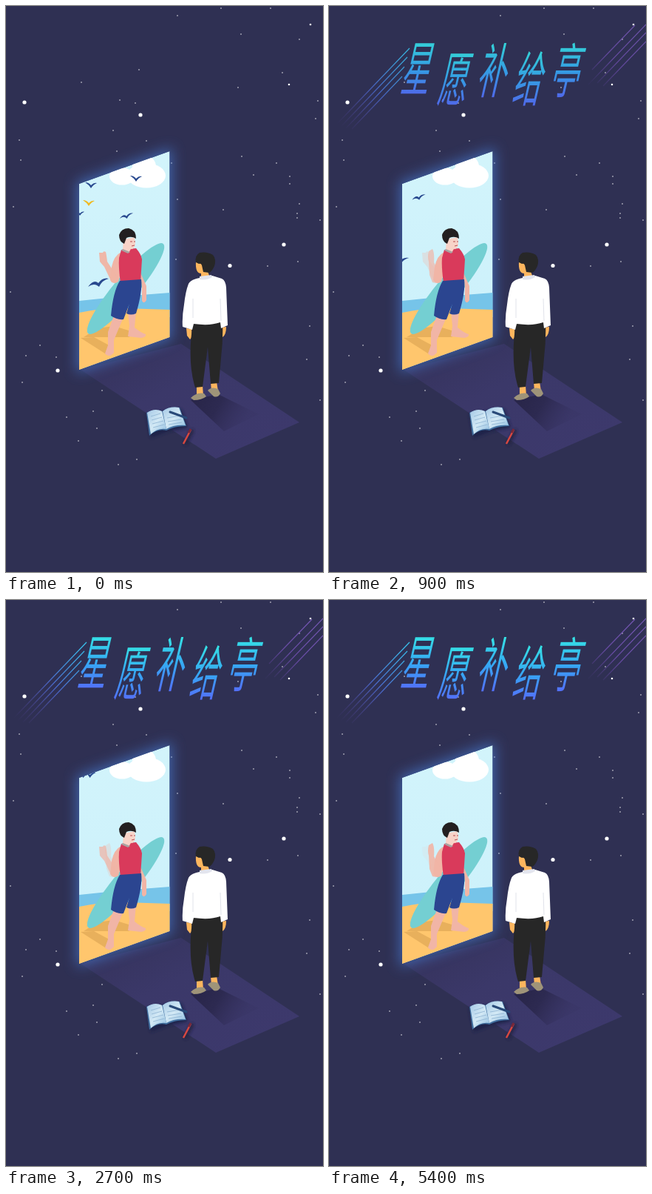
Recreate the animation shown at these times as an HTML page. Size 429 by 764 pixels, loop 5500 ms.

```html
<!DOCTYPE html>
<html lang="zh">
<head>
<meta charset="utf-8">
<style>
  html, body { margin: 0; height: 100%; overflow: hidden; background: #2f3053; }
  svg { display: block; width: 429px; height: 764px; }
  #title text { font: 300 42px "Noto Sans CJK SC", "Noto Sans CJK", sans-serif; text-anchor: middle; fill: url(#ink); }
</style>
</head>
<body>
<svg viewBox="0 0 429 764">
  <defs>
    <linearGradient id="ink" x2="0" y2="1">
      <stop offset=".2" stop-color="#35e6e4"/><stop offset=".55" stop-color="#36a7f4"/><stop offset=".9" stop-color="#5867fa"/>
    </linearGradient>
    <linearGradient id="leftRay" gradientUnits="userSpaceOnUse" x1="108" y1="60" x2="14" y2="162">
      <stop stop-color="#38c4ef"/><stop offset=".5" stop-color="#4a68c8"/><stop offset="1" stop-color="#5a3f96" stop-opacity="0"/>
    </linearGradient>
    <linearGradient id="rightRay" gradientUnits="userSpaceOnUse" x1="429" y1="25" x2="358" y2="106">
      <stop stop-color="#7659b5"/><stop offset=".6" stop-color="#674ba3"/><stop offset="1" stop-color="#5b4296" stop-opacity=".1"/>
    </linearGradient>
    <linearGradient id="sky" x2="0" y2="1"><stop stop-color="#d2f4fb"/><stop offset="1" stop-color="#cbf0fb"/></linearGradient>
    <linearGradient id="floor" x2="1" y2="1"><stop stop-color="#343259"/><stop offset=".4" stop-color="#3b3869"/><stop offset="1" stop-color="#3d396d"/></linearGradient>
    <linearGradient id="shade" gradientUnits="userSpaceOnUse" x1="262" y1="528" x2="322" y2="564">
      <stop stop-color="#29264a"/><stop offset=".4" stop-color="#2d2a51"/><stop offset="1" stop-color="#35315f" stop-opacity=".2"/>
    </linearGradient>
    <linearGradient id="page" x2="1" y2="1"><stop stop-color="#a5c9e6"/><stop offset=".5" stop-color="#d3e9f5"/><stop offset="1" stop-color="#8fbde0"/></linearGradient>
    <filter id="glow" x="-40%" y="-20%" width="180%" height="140%"><feGaussianBlur stdDeviation="9"/></filter>
    <filter id="soft" x="-30%" y="-30%" width="160%" height="160%"><feGaussianBlur stdDeviation="2"/></filter>
    <path id="frame" d="M99 240L221.500 196V447L99 491Z"/>
    <clipPath id="view"><use href="#frame"/></clipPath>
    <path id="bird" d="M-14 6Q-6-5 0 1Q6-7 14-5Q5-3 1 6L-2 4Q-7 1-14 6Z"/>
    <path id="gull" d="M-8-4Q-3-4 0 0Q4-4 8-3Q3-1 0 4Q-3-1-8-4Z"/>
  </defs>

  <g id="stars" fill="#fff"></g>

  <path d="M101 491L237 456L397 562L284 611Z" fill="url(#floor)"/>
  <path d="M250 532L287 524L342 551L295 574Z" fill="url(#shade)"/>

  <use href="#frame" fill="#4a83e0" stroke="#4a83e0" stroke-width="7" opacity=".6" filter="url(#glow)"/>
  <g clip-path="url(#view)">
    <use href="#frame" fill="url(#sky)"/>
    <g fill="#fff">
      <ellipse cx="190" cy="229" rx="26" ry="16.500"/><ellipse cx="157" cy="230" rx="17" ry="11.500"/><circle cx="187" cy="217" r="16"/>
    </g>
    <path d="M99 398Q160 391 222 387V420H99Z" fill="#76c4e9"/>
    <path d="M99 414Q130 407 160 408T222 410V492H99Z" fill="#ffc66d"/>
    <g fill="#e8b05c"><path d="M101 448L119 447L145 461L137 471Z"/><path d="M124 435L146 432L176 441L166 447L105 447Z"/></g>
    <g id="birds"></g>
  </g>

  <g id="surfer">
    <ellipse cx="162" cy="381.500" rx="79" ry="16" fill="#74cfd2" transform="rotate(-50 162 381.500)"/>
    <g fill="#f1b5a6">
      <path d="M182 360L190 378L190 397Q187 403 184 398L184 380Z"/>
      <path d="M147 415L159 420L146 451L146 468Q139 476 134 469L138 458L138 440Z"/>
      <path d="M165 412L176 411L174 434Q184 442 189 443Q190 447 183 448L165 446L167 432Z"/>
      <path d="M156 332Q146 337 143 352L141 370Q146 377 152 372L156 358Z"/>
      <path id="armOut" d="M143 373Q151 375 152 368L137 345Q136 336 135 332Q132 330 131 333L126 333L127 345Q131 350 133 352Z"/>
      <path id="armUp" d="M140 373Q150 376 153 366L142 346Q143 333 140 328L135 331Q133 339 135 345L136 363Z"/>
    </g>
    <path d="M156 329L176 327Q183 335 184 342L182 373L155 374Q152 352 153 340Z" fill="#d93a5b"/>
    <path d="M154 371L183 369Q185 385 176 415Q169 418 163 415L167 402L159 423Q150 424 142 418Q145 385 154 371Z" fill="#2b4590"/>
    <path d="M159 315L174 312L175 322Q173 329 169 328L166 333L158 328Z" fill="#f8d3c8"/>
    <path d="M158 328L168 332L165 334L156 330Z" fill="#aaa3a2"/>
    <path d="M153 309Q156 300 166 300Q176 302 176 314Q170 310 163 313L160 321Q153 318 153 309Z" fill="#231f20"/>
    <path d="M168 318h3m2 0h2m-5 6l4-1" stroke="#b54c50" stroke-width="1"/>
  </g>

  <g id="visitor">
    <g fill="#fdb65e">
      <path d="M258 512h8l1 14h-9ZM277 507h8l2 13h-9Z"/>
      <path d="M244 435L251 436Q253 447 249 450L245 445ZM291 434L298 433Q298 444 293 447Z"/>
      <path d="M257 345L268 345L273 358L276 367L264 369L264 361Q256 361 257 345Z"/>
    </g>
    <g fill="#9f9479"><path d="M250 529Q258 521 268 523L271 527Q265 532 254 532Z"/><path d="M273 519Q278 513 287 517L290 523Q287 529 281 527Z"/></g>
    <path d="M253 427L293 426Q294 450 291 475L288 509L277 510Q275 485 273 460L266 514L256 515Q245 480 253 427Z" fill="#272727"/>
    <path d="M262 367Q270 370 279 364L292 368Q297 370 298 380L300 431L291 435L290 427Q276 432 254 429L252 437L239 433Q238 420 241 403Q243 385 247 375Q250 369 262 367Z" fill="#fff"/>
    <path d="M253 395L253 421M290 395L291 425" stroke="#d8dbe5" stroke-width=".8"/>
    <path d="M262 365L278 363L279 366Q271 371 262 369Z" fill="#e3e5ee"/>
    <path d="M257 346Q255 337 262 333Q272 331 280 336Q285 342 282 351Q279 358 275 360L267 359L265 350Q264 347 261 348Z" fill="#272727"/>
  </g>

  <g id="notebook">
    <path d="M190 551L237 544L246 569L220 574L196 583Z" fill="#1b2448" filter="url(#soft)"/>
    <path d="M190 549L194 580Q205 570 217 573Q228 567 244 567L235 542Q220 540 212 547Q200 543 190 549Z" fill="#416f9f"/>
    <path d="M191 549Q201 542 211 547L217 571Q205 569 196 578Z" fill="url(#page)"/>
    <path d="M212 547Q221 540 234 542L243 566Q227 565 217 571Z" fill="url(#page)"/>
    <path d="M196 554l13-4m-12 9l14-4m-13 9l15-4m-14 9l15-4M218 556l18-3m-17 8l18-3m-17 7l18-3" stroke="#8db3d2" stroke-width=".8"/>
    <path d="M222 548L244 556" stroke="#294a79" stroke-width="3" stroke-linecap="round"/>
    <path d="M242 592L253 572" stroke="#20203d" stroke-width="4" filter="url(#soft)"/>
    <path d="M240 591L250 572" stroke="#d84840" stroke-width="2.500"/>
    <path d="M247 576L250 571" stroke="#74283a" stroke-width="3"/>
  </g>

  <g id="title">
    <g fill="none" stroke="url(#leftRay)" stroke-width="1.200"><path d="M109 57L10 160M106 69L15 164M102 82L23 165M99 95L31 166"/></g>
    <g fill="none" stroke="url(#rightRay)" stroke-width="1.200"><path d="M414 26L356 86M429 25L351 106M429 36L363 104M429 48L371 108"/></g>
  </g>
</svg>
<script>
const $ = id => document.getElementById(id);

function add(parent, tag, attrs) {
  const el = document.createElementNS("http://www.w3.org/2000/svg", tag);
  for (const key in attrs) el.setAttribute(key, attrs[key]);
  return parent.appendChild(el);
}

function scatter(radius, points) {
  for (let i = 0; i < points.length; i += 2)
    add($("stars"), "circle", { cx: points[i], cy: points[i + 1], r: radius });
}
scatter(2.6, [25,130, 182,147, 376,322, 303,350.5, 70,492]);
scatter(1.3, [383,106, 412,25]);
scatter(.75, [232,13, 291,3, 358,3, 318,38, 397,45, 374,90, 314,110, 422,128, 419,152,
  102,103, 180,86, 154,127, 175,131, 145,168, 190,182, 18,181, 20,208, 150,196, 224,212,
  10,271, 232,261, 294,275, 319,203, 335,228, 366,212, 384,230, 384,240, 397,267, 394,280,
  394,286, 425,289, 230,342, 354,351, 395,345, 6,386, 411,432, 407,477, 425,532, 27,472,
  46,458, 68,474, 22,508, 82,555, 118,547, 130,519, 123,570, 98,587, 152,619, 177,612]);

[["星", 122, 84], ["愿", 172, 98], ["补", 225, 87], ["给", 273, 98], ["亭", 324, 87]].forEach(([char, x, y]) => {
  add($("title"), "text", { y: 16, transform: `translate(${x} ${y}) skewX(-13) scale(.93 1.9)` }).textContent = char;
});

// Positions at time "from", speeds in pixels per second
const birds = [
  { x: 115, y: 242, vx: -42, vy: -24, shape: "gull" },
  { x: 112, y: 266, vx: -42, vy: -24, shape: "gull", color: "#f0b91f" },
  { x: 100, y: 280, vx: -42, vy: -24, shape: "gull", size: .75 },
  { x: 176, y: 233, vx: -42, vy: -24, shape: "gull" },
  { x: 163, y: 283, vx: -46, vy: -28, shape: "bird", size: .65 },
  { x: 125, y: 373, vx: -34, vy: -31, shape: "bird" },
  { from: 1600, x: 228, y: 291, vx: -104, vy: -50, shape: "gull" },
  { from: 1600, x: 219, y: 292, vx: -104, vy: -50, shape: "gull", size: .75 }
];
for (const b of birds) b.el = add($("birds"), "use", { href: "#" + b.shape, fill: b.color || "#28498f" });

function draw(ms) {
  const fade = 1 - (1 - Math.min(ms / 1300, 1)) ** 2;
  $("title").setAttribute("opacity", fade);

  const wave = .5 - .5 * Math.cos((ms + 200) / 3500 * 2 * Math.PI);
  $("armOut").setAttribute("opacity", 1 - wave);
  $("armUp").setAttribute("opacity", wave);

  for (const { el, x, y, vx, vy, from = 0, size = 1 } of birds) {
    const s = (ms - from) / 1000;
    el.setAttribute("transform", `translate(${x + vx * s} ${y + vy * s}) scale(${size})`);
    el.setAttribute("visibility", s < 0 ? "hidden" : "visible");
  }
}

const start = performance.now();
function tick() {
  const ms = (performance.now() - start) % 5500;
  draw(Math.floor(ms / 100) * 100);
  requestAnimationFrame(tick);
}
tick();
</script>
</body>
</html>
```
